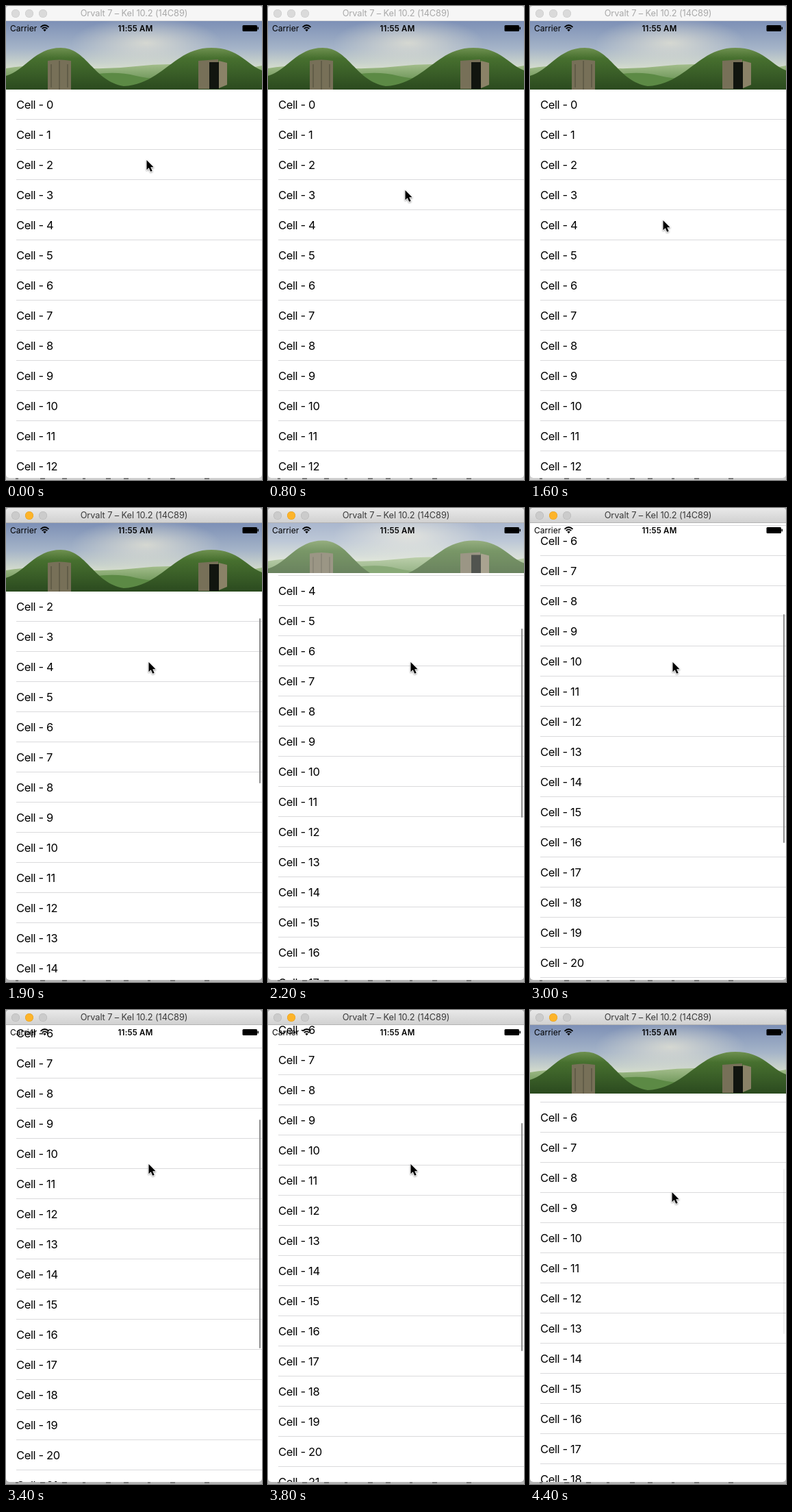
Write an HTML page that moves like this. It is 374 px wide and 692 px high and loops after 4500 ms.

```html
<!DOCTYPE html>
<html lang="en">
<head>
<meta charset="utf-8">
<style>
  html, body { margin: 0; width: 100%; height: 100%; overflow: hidden; background: #c9c9c9; }
  #stage { position: relative; width: 374px; height: 692px; overflow: hidden; color: #000; font-family: Inter, Roboto, sans-serif; }
  #stage > * { position: absolute; }
  #window { left: 0; top: 0; width: 374px; height: 689px; background: #fff; border-radius: 5px; overflow: hidden; }
  #window > * { position: absolute; left: 0; }
  #specks { left: 0; top: 689px; }
  #title { top: 0; width: 374px; height: 22px; box-sizing: border-box; border-bottom: 1px solid #dcdcdc;
    background: #f6f6f6; color: #a9a9a9; font-size: 12.8px; line-height: 22px; letter-spacing: -.1px; text-align: center; }
  #title i { position: absolute; top: 5px; width: 12px; height: 12px; border-radius: 50%; background: #dadada; box-shadow: inset 0 0 0 .5px #c6c6c6; }
  #title.active { background: linear-gradient(#e9e9e9, #d1d1d1); border-color: #b3b3b3; color: #3b3b3b; }
  #title.active i { background: #cbcbcb; box-shadow: inset 0 0 0 .5px #b5b5b5; }
  #title.active i:nth-of-type(2) { background: #fdb42a; box-shadow: inset 0 0 0 .5px #df9c20; }
  #table { width: 374px; overflow: hidden; }
  #cells { position: absolute; left: 15px; width: 359px; }
  #cells div { height: 44px; box-sizing: border-box; border-bottom: 1px solid #dadadc; font-size: 16.5px; line-height: 44px; letter-spacing: -.35px; }
  #header { top: 22px; width: 374px; overflow: hidden; }
  #header svg { display: block; }
  #status { top: 22px; }
  #bar { width: 2.5px; border-radius: 2px; background: #8d8d8d; }
  #window > #bar { left: 369.5px; }
  #cursor { left: 0; top: 0; overflow: visible; filter: drop-shadow(0 1px 1px #0006); }
</style>
</head>
<body>
<div id="stage">
  <svg id="specks" width="374" height="3"></svg>
  <div id="window">
    <div id="table"><div id="cells"></div></div>
    <div id="header">
      <svg id="scene" width="374" height="100">
        <defs>
          <linearGradient id="sky" x2="0" y2="1">
            <stop stop-color="#7d90b6"/><stop offset=".4" stop-color="#a5b4c8"/><stop offset=".68" stop-color="#d3dbcd"/>
          </linearGradient>
          <radialGradient id="glow"><stop stop-color="#e8e6d6" stop-opacity=".75"/><stop offset="1" stop-color="#e8e6d6" stop-opacity="0"/></radialGradient>
          <linearGradient id="far" x2="0" y2="1"><stop stop-color="#a3bd8b"/><stop offset="1" stop-color="#4f7f3c"/></linearGradient>
          <linearGradient id="hill" x2="0" y2="1">
            <stop stop-color="#6f9150"/><stop offset=".25" stop-color="#47702f"/><stop offset="1" stop-color="#2b4a1f"/>
          </linearGradient>
        </defs>
        <rect width="374" height="100" fill="url(#sky)"/>
        <ellipse cx="205" cy="32" rx="110" ry="38" fill="url(#glow)"/>
        <path d="M0 69Q40 62 90 67T190 66T290 66T374 65V100H0Z" fill="url(#far)"/>
        <path d="M100 84Q150 70 190 80T270 76V100H100Z" fill="#5c8a45"/>
        <path d="M0 80C28 72 42 39 80 39C118 39 128 88 172 95C228 92 246 39 300 39C340 39 352 64 374 72V100H0Z" fill="url(#hill)"/>
        <path d="M61 58Q78 55 95 58V100H61Z" fill="#777058"/>
        <path d="M78 58V100M66 63V97M90 63V97" stroke="#4e4a39"/>
        <path d="M281 58L310 56V99H281Z" fill="#777058"/>
        <path d="M297 60H311V99H297Z" fill="#11150f"/>
        <path d="M311 58L323 61V93L311 98Z" fill="#8a8267"/>
      </svg>
    </div>
    <svg id="status" width="374" height="20">
      <text x="6" y="14.5" font-size="12">Carrier</text>
      <g fill="none" stroke="#000" stroke-width="1.8">
        <path d="M50.5 8.8Q56.5 3.2 62.5 8.8M52.7 11.2Q56.5 7.6 60.3 11.2"/>
      </g>
      <path d="M54.3 12.8Q56.5 10.8 58.7 12.8L56.5 15.2Z"/>
      <text x="189" y="14.5" font-size="11.5" font-weight="600" letter-spacing=".2" text-anchor="middle">11:55 AM</text>
      <rect x="345.5" y="6" width="21.5" height="9" rx="1.5"/>
      <rect x="367.5" y="8.5" width="1.5" height="4" rx=".7"/>
    </svg>
    <div id="bar"></div>
    <div id="title"><i style="left:8px"></i><i style="left:28px"></i><i style="left:48px"></i>Orvalt 7 – Kel 10.2 (14C89)</div>
  </div>
  <svg id="cursor" width="14" height="20">
    <path d="M.5 0V14.2L3.7 11.2L6.2 16.8L8.7 15.7L6.2 10.3H10.6Z" stroke="#fff" stroke-width="1.6" paint-order="stroke" stroke-linejoin="round"/>
  </svg>
</div>
<script>
const $ = id => document.getElementById(id);
const LOOP = 4500, STEP = 100, TOP = 22, BOTTOM = 689, ROWS = 30;

// Each key is [time, ...values]
const scrollKeys = [[1600, 0], [1700, 8], [1800, 45], [1900, 88], [2000, 121], [2100, 149], [2200, 172],
  [2400, 205], [2600, 230], [2800, 248], [3000, 260], [3200, 268], [3400, 273.5], [3600, 277], [3800, 279],
  [3900, 275], [4000, 262], [4100, 251]];
const headerKeys = [[1900, 100], [2200, 73], [2600, 35], [2980, 0], [4000, 0], [4100, 25], [4200, 62], [4300, 92], [4400, 100]];
const cursorKeys = [[0, 205, 225], [1600, 194, 313], [1700, 196, 305], [1800, 202, 268], [1900, 208, 225],
  [3800, 208, 225], [4000, 207, 252], [4100, 207, 266]];
const barKeys = [[1700, 127, 241], [1900, 161, 241], [2200, 176, 276], [2600, 172, 318], [3000, 155, 334],
  [3800, 165, 333], [4000, 157, 333], [4100, 171, 310], [4400, 232, 241]];
const barFade = [[1600, 0], [1700, 1], [4200, 1], [4400, .15]];

function at(t, keys) {
  const i = keys.findIndex(k => k[0] > t);
  if (i === 0) return keys[0].slice(1);
  if (i < 0) return keys[keys.length - 1].slice(1);
  const a = keys[i - 1], b = keys[i], p = (t - a[0]) / (b[0] - a[0]);
  return a.slice(1).map((v, j) => v + (b[j + 1] - v) * p);
}

$('cells').innerHTML = Array.from({ length: ROWS }, (_, i) => `<div>Cell - ${i}</div>`).join('');
$('specks').innerHTML = [14, 50, 82, 112, 146, 172, 207, 240, 290]
  .map((x, i) => `<rect x="${x}" width="${i % 3 ? 7 : 4}" height="2" fill="#777"/>`).join('');

function draw(t) {
  const active = t >= 1700;
  const height = Math.round(at(t, headerKeys)[0]);
  const offset = Math.round(at(t, scrollKeys)[0]);
  const [x, y] = at(t, cursorKeys).map(Math.round);
  const [barTop, barHeight] = at(t, barKeys);

  $('title').className = active ? 'active' : '';
  $('header').style.height = height + 'px';
  $('header').style.opacity = height / 100;
  $('scene').style.transform = `translateY(${(height - 100) / 2}px)`;
  $('table').style.top = TOP + height + 'px';
  $('table').style.height = BOTTOM - TOP - height + 'px';
  $('cells').style.top = -offset + 'px';
  $('bar').style.top = barTop + 'px';
  $('bar').style.height = barHeight + 'px';
  $('bar').style.opacity = at(t, barFade)[0];
  $('cursor').style.transform = `translate(${x}px, ${y}px)`;
  $('stage').style.background = active ? '#b4b4b4' : '#cfcfcf';
}

const start = performance.now();
function tick() {
  const t = (performance.now() - start) % LOOP;
  draw(Math.floor(t / STEP) * STEP);
  requestAnimationFrame(tick);
}
tick();
</script>
</body>
</html>
```
